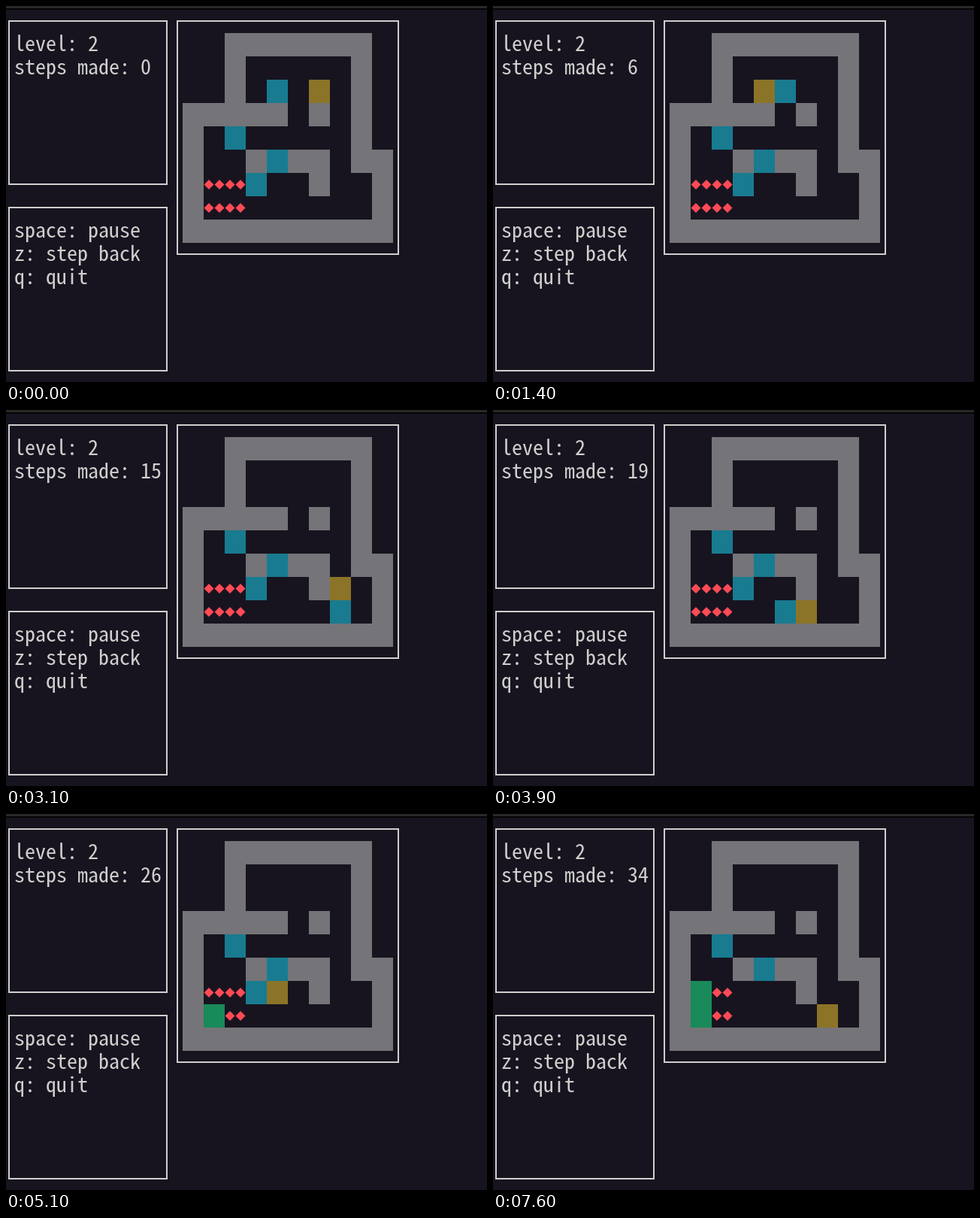
Recreate the animation shown at these times as an HTML page. Size 640x500 px, loop 8 s.

```html
<!DOCTYPE html>
<html lang="en">
<head>
<meta charset="utf-8">
<title>Box pushing game</title>
<style>
  html, body { margin: 0; width: 100%; height: 100%; overflow: hidden; background: #171420; }
  svg { display: block; width: 640px; height: 500px; }
  text { font: 28px "Noto Sans Mono CJK JP", "Noto Sans Mono", monospace; fill: #d0cfcc; white-space: pre; }
  .panel { fill: none; stroke: #d0cfcc; stroke-width: 2; }
  .wall { fill: #757478; }
  .goal { fill: #ff4b55; }
  .box { fill: #197b90; }
  .done { fill: #198a5a; }
  .player { fill: #8b7427; }
</style>
</head>
<body>
<svg viewBox="0 0 640 500" shape-rendering="crispEdges">
  <rect width="640" height="3" fill="#292a27"/>
  <rect y="3" width="640" height="2" fill="#050506"/>
  <rect class="panel" x="4" y="20" width="210" height="217"/>
  <rect class="panel" x="4" y="268" width="210" height="217"/>
  <rect class="panel" x="228" y="20" width="294" height="310"/>
  <text x="11" y="60">level: 2</text>
  <text x="11" y="91" id="steps"></text>
  <text x="11" y="308">space: pause</text>
  <text x="11" y="339">z: step back</text>
  <text x="11" y="370">q: quit</text>
  <g id="board"></g>
  <g id="pieces"></g>
</svg>
<script>
const LOOP = 8000, W = 28, H = 31, LEFT = 235, TOP = 36;
const level = [
  '  #######',
  '  #     #',
  '  # $ @ #',
  '##### # #',
  '# $     #',
  '#  #$## ##',
  '#..$  #  #',
  '#..      #',
  '##########'
];
const moves = 'ULLLDRRRURDDDDDRDLLLLLLRRULLRRDRRR';
const times = [
  400, 700, 900, 1000, 1200, 1400, 1700, 1800, 2000, 2100, 2300, 2600,
  2600, 2900, 3100, 3300, 3500, 3600, 3900, 4000, 4200, 4300, 4500,
  4700, 4900, 5100, 5300, 5500, 6600, 6900, 7100, 7300, 7400, 7600
];
const dirs = { U: [0, -1], D: [0, 1], L: [-1, 0], R: [1, 0] };
const $ = id => document.getElementById(id);

const find = mark => level.flatMap((row, y) =>
  [...row].flatMap((c, x) => c === mark ? [[x, y]] : []));
const same = (a, b) => a[0] === b[0] && a[1] === b[1];
const cell = (kind, [x, y]) =>
  `<rect class="${kind}" x="${LEFT + x * W}" y="${TOP + y * H}" width="${W}" height="${H}"/>`;
const diamond = (x, y) =>
  `<path class="goal" shape-rendering="auto" d="M${x} ${y - 6.5}l6.5 6.5l-6.5 6.5l-6.5 -6.5z"/>`;

const goals = find('.');
$('board').innerHTML = find('#').map(p => cell('wall', p)).join('') +
  goals.map(([x, y]) => [7, 21].map(dx =>
    diamond(LEFT + x * W + dx, TOP + y * H + 15.5)).join('')).join('');

// Play the moves once and keep the position after each step.
const states = [{ player: find('@')[0], boxes: find('$') }];
for (const m of moves) {
  const { player, boxes } = states.at(-1);
  const go = p => [p[0] + dirs[m][0], p[1] + dirs[m][1]];
  const next = go(player);
  states.push({ player: next, boxes: boxes.map(b => same(b, next) ? go(b) : b) });
}

let shown = -1;
function draw(now) {
  const t = now % LOOP;
  const n = times.filter(s => s <= t).length;
  if (n !== shown) {
    const { player, boxes } = states[shown = n];
    $('steps').textContent = 'steps made: ' + n;
    $('pieces').innerHTML = boxes.map(b =>
      cell(goals.some(g => same(g, b)) ? 'done' : 'box', b)).join('') + cell('player', player);
  }
  requestAnimationFrame(draw);
}
draw(0);
</script>
</body>
</html>
```
